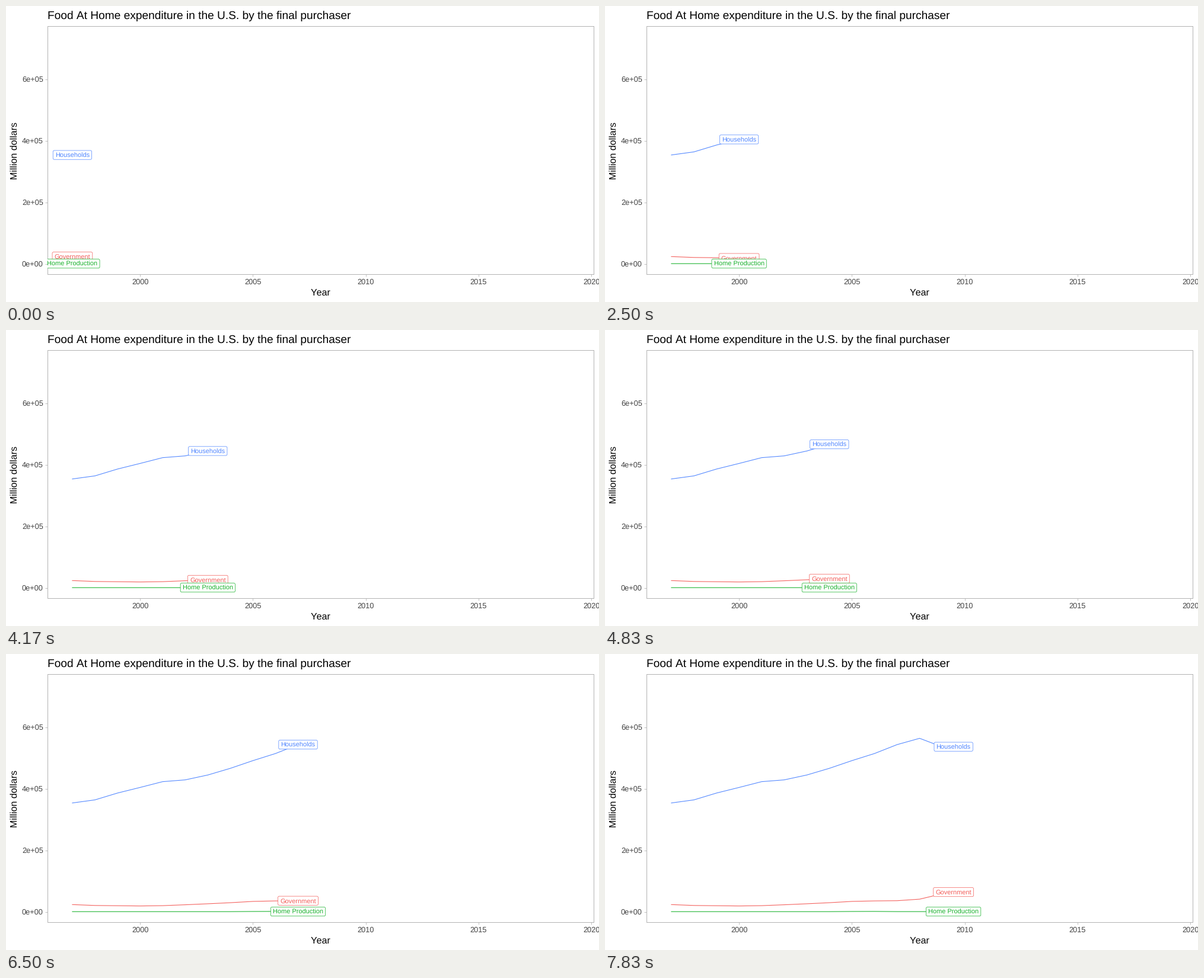
A matplotlib script for the animation above (8000 ms loop, 1000 px wide and 500 px high).

```python
import matplotlib.pyplot as plt
import numpy as np
from matplotlib.animation import FuncAnimation
from matplotlib.patches import FancyBboxPatch
from matplotlib.transforms import Affine2D

plt.rcParams["font.family"] = "Liberation Sans"
plt.rcParams["text.hinting"] = "none"
plt.rcParams["text.kerning_factor"] = 6   # plain advances, no kerning

W, H, DPI = 1000, 500, 100
PT = 72 / DPI            # points per pixel
INTERVAL = 50            # ms
FRAMES = 160
HOLD = 5                 # ticks before the lines start to grow
GREY = "#b3b3b3"

# Billions of dollars per year, from 1997 on
SERIES = {
    "Government": ("#F35E5A", [23.7, 20.8, 20, 19.2, 20.2, 23.1, 26.3,
                               29.8, 34, 35.6, 36.3, 41.3, 58.7, 70]),
    "Home Production": ("#17B12B", [0.8] * 8 + [1.3, 1.5] + [0.9] * 4),
    "Households": ("#5086FF", [353.8, 363.8, 386, 404.2, 423, 428.8, 444.6,
                               466.3, 491.3, 514.4, 543.3, 563.8, 536, 537]),
}
YEARS = 1997 + np.arange(14)
KNOTS = np.round(3.37 * np.arange(14))   # tick on which each year is reached

# Panel edges and the place of (1997, 0), in pixels from the top left
LEFT, RIGHT, TOP, BOTTOM = 70, 991, 34, 453
X0, Y0 = 111.9, 435.6
PX_YEAR, PX_BILLION = 38.06, 0.52

fig = plt.figure(figsize=(W / DPI, H / DPI), dpi=DPI, facecolor="white")
ax = fig.add_axes([LEFT / W, 1 - BOTTOM / H,
                   (RIGHT - LEFT) / W, (BOTTOM - TOP) / H])
ax.set_xlim(1997 + (LEFT - X0) / PX_YEAR, 1997 + (RIGHT - X0) / PX_YEAR)
ax.set_ylim((Y0 - BOTTOM) / PX_BILLION, (Y0 - TOP) / PX_BILLION)
ax.set_xticks([2000, 2005, 2010, 2015, 2020])
ax.set_yticks([0, 200, 400, 600], ["0e+00", "2e+05", "4e+05", "6e+05"])
ax.tick_params(length=4 * PT, width=0.8 * PT, pad=3.2 * PT, color=GREY,
               labelsize=12.8 * PT, labelcolor="#444444")
ax.tick_params(axis="x", pad=3.7 * PT)
for spine in ax.spines.values():
    spine.set(color=GREY, linewidth=PT, zorder=1.5)


def write(x, y, text, size, **kw):
    fig.text(x / W, 1 - y / H, text, fontsize=size * PT, color="black",
             va="baseline", **kw)


write(69.5, 22, "Food At Home expenditure in the U.S. by the final purchaser",
      19.2)
write(531, 489, "Year", 16, ha="center")
write(19.3, 244.5, "Million dollars", 16, ha="center", rotation=90,
      rotation_mode="anchor")


class Trace:
    """A growing line with a boxed name at its tip."""

    def __init__(self, name, color, values, z):
        self.values = np.array(values)
        self.line, = ax.plot([], [], color=color, lw=1.07 * PT, zorder=1,
                             snap=False)
        self.shift = Affine2D()
        text = ax.text(0, -4, name, color=color, fontsize=11.04 * PT,
                       ha="center", va="baseline", transform=self.shift,
                       clip_on=True, zorder=z + 0.05)
        w = text.get_window_extent(fig.canvas.get_renderer()).width + 7.2
        h = 15.2
        ax.add_patch(FancyBboxPatch(
            (-w / 2, -h / 2), w, h, transform=self.shift, zorder=z,
            boxstyle="round,pad=0,rounding_size=2.16",
            fc="white", ec=color, lw=0.7 * PT))

    def reveal(self, now):
        past = YEARS < now
        tip = np.interp(now, YEARS, self.values)
        self.line.set_data(np.append(YEARS[past], now),
                           np.append(self.values[past], tip))
        self.shift.clear().translate(*ax.transData.transform((now, tip)))


traces = [Trace(name, color, values, 2 + 0.1 * i)
          for i, (name, (color, values)) in enumerate(SERIES.items())]


def update(n):
    tick = (n * INTERVAL + 40) * 6 // 1000   # six pictures a second
    now = np.interp(max(0, tick - HOLD), KNOTS, YEARS)
    for trace in traces:
        trace.reveal(now)


anim = FuncAnimation(fig, update, frames=FRAMES, interval=INTERVAL,
                     repeat=True, repeat_delay=0, blit=False)
plt.show()
```
